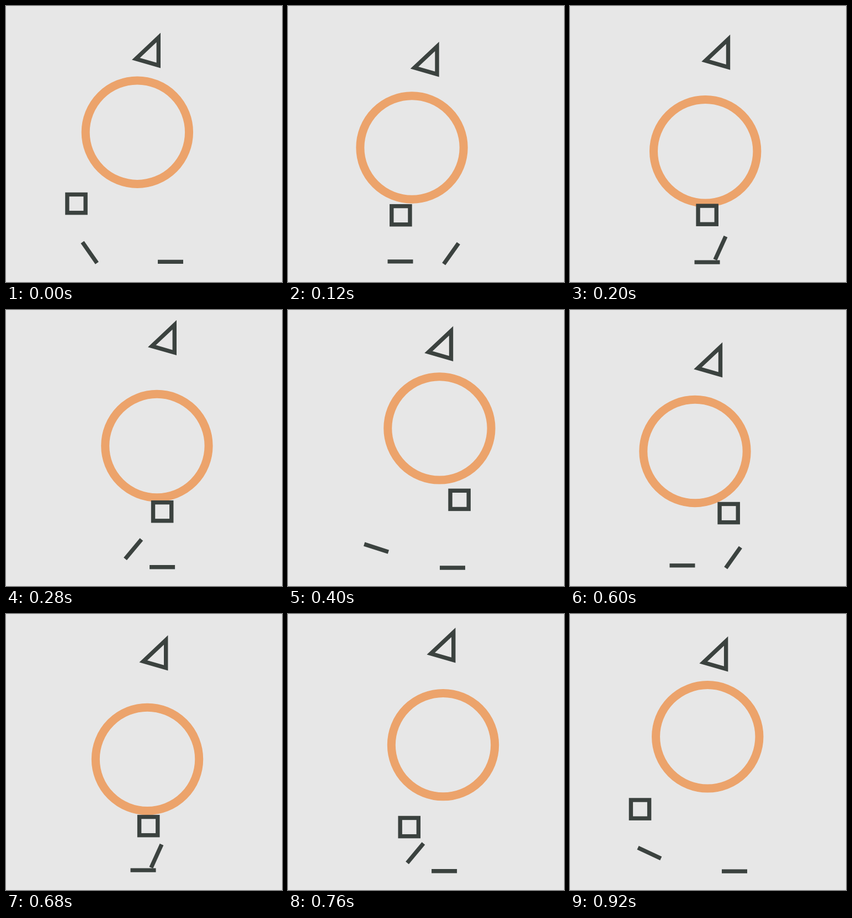
Write an HTML page that moves like this. It is 500 by 500 pixels and loops after 960 ms.

```html
<!DOCTYPE html>
<html lang="en">
<head>
<meta charset="utf-8">
<title>Walk cycle</title>
<style>
  html, body { margin: 0; width: 100%; height: 100%; overflow: hidden; background: #e7e7e7; }
  svg { display: block; width: 100%; height: 100%; }
  .ink { fill: none; stroke: #3b423f; stroke-width: 7.4; }
</style>
</head>
<body>
<svg viewBox="0 0 500 500">
  <circle id="body" r="93.7" fill="none" stroke="#eca36b" stroke-width="15"/>
  <path id="head" class="ink" d="M-3.7 8.6V59L-44.7 47.2Z"/>
  <rect id="hand" class="ink" x="-16.6" y="-16.6" width="33.2" height="33.2"/>
  <path id="footA" class="ink" d="M-23 0H23"/>
  <path id="footB" class="ink" d="M-23 0H23"/>
</svg>
<script>
const LOOP = 960, STEP = 40;

// Cosine swing between turning points [time, value]. A power above 1
// lingers at the low value of each swing, below 1 at the high value.
const swing = (power, ...turns) => time => {
  const next = turns.findIndex(([t]) => t > time);
  const [t0, from] = turns.at(next < 0 ? -1 : next - 1);
  const [t1, to] = turns[Math.max(next, 0)];
  const lap = t => (t + LOOP) % LOOP;
  const u = lap(time - t0) / lap(t1 - t0);
  const ease = (1 - Math.cos(Math.PI * u)) / 2;
  const low = Math.min(from, to), high = Math.max(from, to);
  return low + (high - low) * (to > from ? ease : 1 - ease) ** power;
};

const still = () => 0;

const body = {
  x: swing(1, [100, 223.5], [340, 282], [590, 226], [760, 281]),
  y: swing(1.2, [190, 263.5], [435, 213], [655, 265], [855, 219]),
  turn: still
};
const head = {
  x: swing(1, [95, 272.5], [320, 312], [535, 270], [765, 303.5]),
  y: swing(1, [140, 65], [320, 12], [530, 66], [780, 24]),
  turn: still
};
const hand = {
  x: swing(0.5, [0, 127.5], [440, 312.5], [920, 127]),
  y: swing(1, [155, 381], [440, 342], [735, 388], [900, 353]),
  turn: still
};
// Land, slide back with the ground, peel off the toe, swing forward.
const foot = {
  x: swing(0.7, [5, 152], [370, 298], [565, 298], [930, 142]),
  y: swing(1, [60, 462.5], [400, 467], [780, 433], [900, 431]),
  turn: swing(1, [0, 55], [50, 0], [520, 0], [625, -63], [700, -66], [920, 25])
};

const parts = [
  ["body", body, 0], ["head", head, 0], ["hand", hand, 0],
  ["footA", foot, 0], ["footB", foot, LOOP / 2]
].map(([id, motion, shift]) => [document.getElementById(id), motion, shift]);

function draw() {
  const now = Math.floor(performance.now() / STEP) * STEP;
  for (const [el, { x, y, turn }, shift] of parts) {
    const t = (now + shift) % LOOP;
    el.setAttribute("transform", `translate(${x(t)} ${y(t)}) rotate(${turn(t)})`);
  }
  requestAnimationFrame(draw);
}
draw();
</script>
</body>
</html>
```
